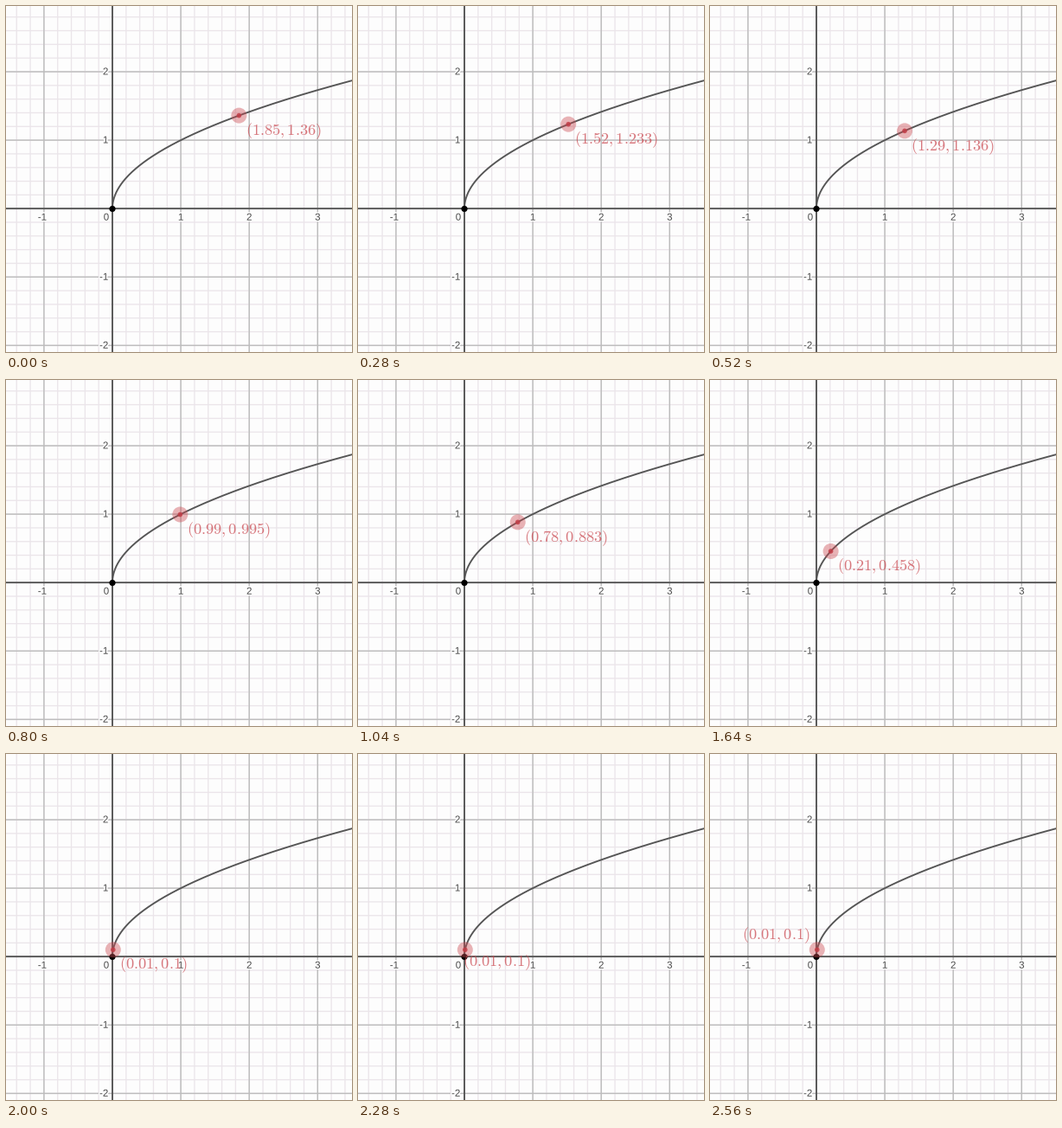
Animation, 400 px wide and 400 px high, one loop 3080 ms. Source, as a matplotlib script:

```python
import numpy as np
import matplotlib.pyplot as plt
from matplotlib.animation import FuncAnimation
from matplotlib.patches import Circle
from matplotlib.patheffects import withStroke

plt.rcParams["mathtext.fontset"] = "cm"

SIZE, DPI = 400, 100
TICK, TICKS = 40, 77
PX = 72 / DPI                      # points per pixel
OX, OY, UNIT = 123.0, 234.2, 79.1  # origin and scale in pixels
RED = "#cb4a52"

# Ticks at which the point jumps, and its x at a few of those jumps.
JUMPS = [2, 4, 5, 7, 9, 11, 13, 15,
         17, 19, 20, 22, 24, 25, 27, 29,
         31, 33, 35, 37, 39, 41, 43, 44, 50]
KEY_STEP = [0, 4, 8, 11, 16, 17, 22, 24, 25]
KEY_X = [1.85, 1.52, 1.22, 0.99, 0.64, 0.57, 0.21, 0.04, 0.01]

LABEL_OFFSET = (7.2, 22.3)
SLIDE_START, SLIDE_END = 57, 64
SLIDE = np.array([-94, -34])


def to_px(x, y):
    return OX + UNIT * x, OY - UNIT * y


fig = plt.figure(figsize=(SIZE / DPI, SIZE / DPI), dpi=DPI, facecolor="#fdfdfd")
ax = fig.add_axes([0, 0, 1, 1])
ax.set_xlim(0, SIZE)
ax.set_ylim(SIZE, 0)
ax.axis("off")


def cross(x, y, color, width, z):
    ax.axvline(x, color=color, lw=width * PX, zorder=z, snap=False)
    ax.axhline(y, color=color, lw=width * PX, zorder=z, snap=False)


def grid_lines(step, color, width, z):
    for n in np.arange(-5, 5 + step / 2, step):
        cross(*to_px(n, n), color, width, z)


def axis_label(x, y, text, ha="center"):
    ax.text(x, y, text, family="Liberation Sans", size=11.5 * PX, color="#4a4a4a",
            ha=ha, va="center_baseline", zorder=4,
            path_effects=[withStroke(linewidth=3 * PX, foreground="#fdfdfd")])


grid_lines(0.2, "#ebe5ea", 1.3, 1)
grid_lines(1, "#bcbcbc", 1.4, 2)
cross(OX, OY, "#505050", 1.8, 3)

for n in (-1, 1, 2, 3):
    axis_label(to_px(n, 0)[0] - (2 if n < 0 else 0), 243.7, str(n))
for n in (-2, -1, 1, 2):
    axis_label(118.3, to_px(0, n)[1] - 0.6, str(n), "right")
axis_label(116, 243.7, "0")

root = np.linspace(0, 2, 300)
ax.plot(*to_px(root ** 2, root), color="#555555", lw=1.9 * PX, zorder=5)
ax.add_patch(Circle((OX, OY + 0.3), 3.6, color="black", lw=0, zorder=6))

halo = ax.add_patch(Circle((0, 0), 9, fc=RED, alpha=0.42, lw=0, zorder=7))
core = ax.add_patch(Circle((0, 0), 2.8, fc="#c23c46", alpha=0.85, lw=0, zorder=8))
label = ax.text(0, 0, "", size=18.3 * PX, color=RED, alpha=0.75,
                ha="left", va="baseline", zorder=9)


def slide_amount(tick):
    if tick < SLIDE_START:
        return 0
    p = np.interp(tick, [SLIDE_START, SLIDE_END], [0.2, 1])
    return p * p * (3 - 2 * p)


def update(tick):
    step = np.searchsorted(JUMPS, tick, side="right")
    x = round(float(np.interp(step, KEY_STEP, KEY_X)), 2)
    y = x ** 0.5
    center = np.array(to_px(x, y))
    halo.center = core.center = tuple(center)
    label.set_position(center + LABEL_OFFSET + SLIDE * slide_amount(tick))
    label.set_text(f"$({x:g}, {round(y, 3):g})$")
    return halo, core, label


anim = FuncAnimation(fig, update, frames=TICKS, interval=TICK,
                     init_func=lambda: update(0), repeat=True, repeat_delay=0)
plt.show()
```
